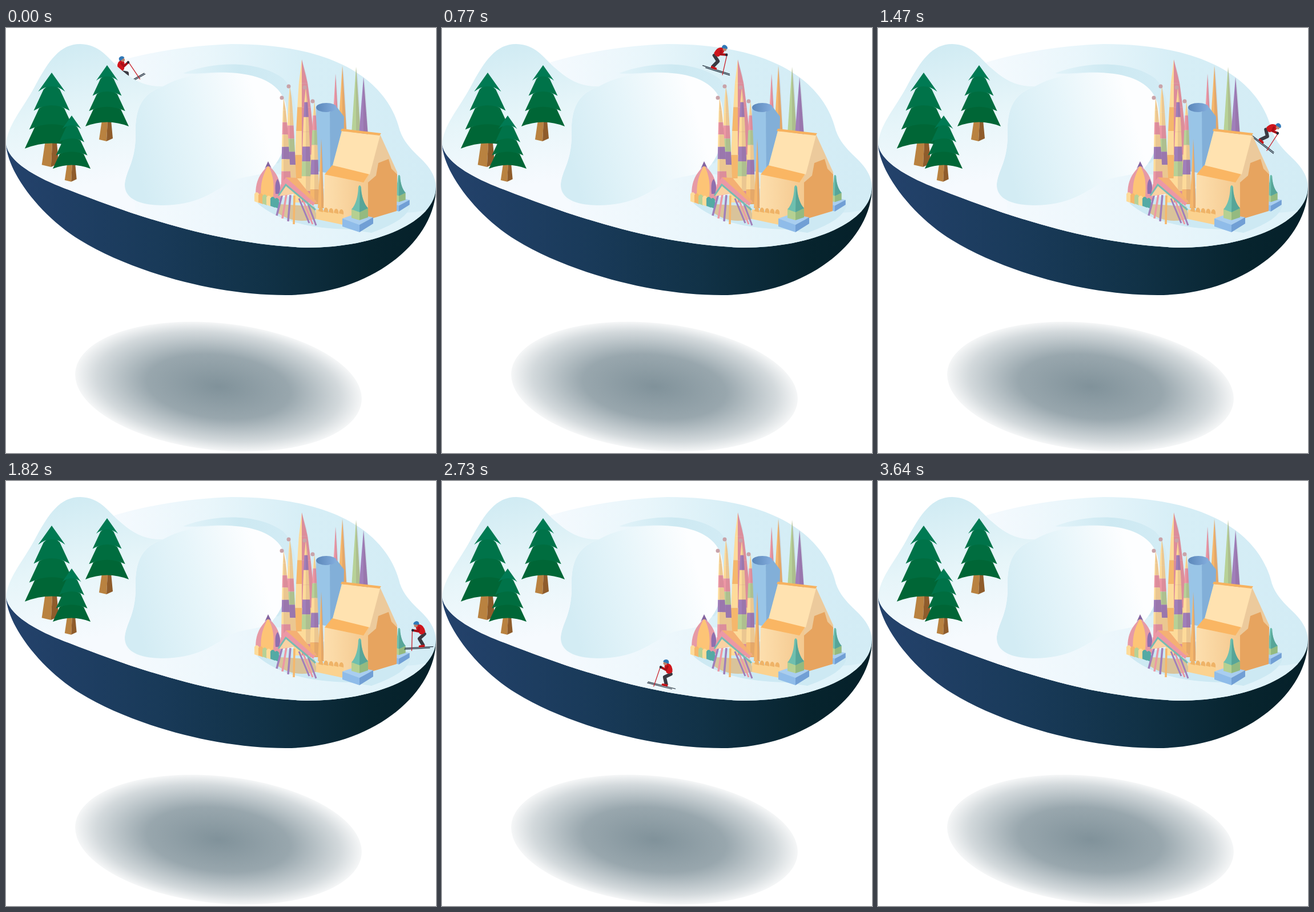
Write an HTML page that moves like this. It is 753 px wide and 743 px high and loops after 3.94 s.

```html
<!DOCTYPE html>
<html lang="en">
<head>
<meta charset="utf-8">
<title>Skier on a floating island</title>
<style>
  html, body { margin: 0; width: 100%; height: 100%; overflow: hidden; background: #fff; }
  svg { display: block; width: 100%; height: 100%; }
</style>
</head>
<body>
<svg viewBox="0 0 753 743">
  <defs>
    <linearGradient id="side">
      <stop stop-color="#24426c"/><stop offset=".35" stop-color="#193a59"/>
      <stop offset=".6" stop-color="#113247"/><stop offset=".85" stop-color="#07242e"/><stop offset="1" stop-color="#052029"/>
    </linearGradient>
    <linearGradient id="ground" gradientUnits="userSpaceOnUse" x1="190" x2="753" y1="200" y2="180">
      <stop stop-color="#f5fafe"/><stop offset=".3" stop-color="#e9f6fb"/>
      <stop offset=".6" stop-color="#d6eef6"/><stop offset="1" stop-color="#d3ecf5"/>
    </linearGradient>
    <linearGradient id="front" gradientUnits="userSpaceOnUse" x1="200" x2="700" y1="0" y2="0">
      <stop stop-color="#f5fafe"/><stop offset="1" stop-color="#dff2f9"/>
    </linearGradient>
    <linearGradient id="hill" gradientUnits="userSpaceOnUse" x1="105" x2="150" y1="30" y2="275">
      <stop stop-color="#d0ebf3"/><stop offset=".5" stop-color="#e6f5f9"/><stop offset="1" stop-color="#f6fafe"/>
    </linearGradient>
    <linearGradient id="bowl" gradientUnits="userSpaceOnUse" x1="222" x2="450" y1="225" y2="160">
      <stop stop-color="#d3ecf4"/><stop offset=".5" stop-color="#e6f5fa"/><stop offset="1" stop-color="#fdfeff"/>
    </linearGradient>
    <linearGradient id="crescent">
      <stop stop-color="#e2f3f9"/><stop offset=".5" stop-color="#cde9f2"/><stop offset="1" stop-color="#d3ecf5"/>
    </linearGradient>
    <linearGradient id="wall"><stop stop-color="#fddfae"/><stop offset="1" stop-color="#f3c78d"/></linearGradient>
    <linearGradient id="pool"><stop stop-color="#5b87ba"/><stop offset="1" stop-color="#84aede"/></linearGradient>
    <radialGradient id="shadow">
      <stop stop-color="#0b2d3d" stop-opacity=".52"/><stop offset=".5" stop-color="#0b2d3d" stop-opacity=".42"/>
      <stop offset=".85" stop-color="#0b2d3d" stop-opacity=".18"/><stop offset="1" stop-color="#0b2d3d" stop-opacity=".04"/>
    </radialGradient>
    <!-- Everything above the front rim of the island -->
    <clipPath id="aboveRim">
      <path d="M0 0V203C5 236 58 264 110 283C230 330 375 379 527 384C650 384 753 338 753 278V0Z"/>
    </clipPath>
    <!-- Faces right, origin at the middle of the skis -->
    <g id="skier" fill="none" stroke-linecap="round" stroke-linejoin="round">
      <path d="M-25 2L24 -2M-19 3.500L25 0" stroke="#26323f" stroke-width="1.200"/>
      <path d="M-13 -22L-3 -15L-8 -3" stroke="#3a3a42" stroke-width="6"/>
      <path d="M-9 -1.500h7" stroke="#c4161c" stroke-width="4"/>
      <path d="M-15 -26Q-14 -38 -5 -40Q2 -38 0 -32L-5 -23Q-11 -20 -15 -26Z" fill="#cf161d"/>
      <path d="M-5 -34L-3 -28L6 -31" stroke="#a90f18" stroke-width="4"/>
      <path d="M7 -33L13 4" stroke="#c9202a" stroke-width="1.300"/>
      <circle cx="6.500" cy="-31" r="2.300" fill="#252b38"/>
      <circle cx="0" cy="-39" r="3.300" fill="#b9826b"/>
      <path d="M-6 -39Q-7 -46 -1 -46Q4 -45 4 -41Z" fill="#2f78b7"/>
    </g>
  </defs>

  <ellipse cx="372" cy="627" rx="252" ry="111" transform="rotate(6 372 627)" fill="url(#shadow)"/>
  <path fill="url(#side)" d="M0 203C3 254 62 330 130 371C220 426 365 467 490 467C640 467 753 372 753 278L527 250L110 200Z"/>
  <g clip-path="url(#aboveRim)">
    <path fill="url(#ground)" d="M0 203V400H753V278C750 232 706 224 690 180C671 100 588 28 395 28C310 31 240 45 190 60Z"/>
    <path fill="url(#front)" d="M208 260V400H735V318C640 345 560 250 450 255Z"/>
    <path fill="url(#crescent)" d="M310 79C370 56 445 58 485 88C520 120 510 190 478 236L455 240C500 170 490 90 390 78C360 76 330 82 310 79Z"/>
    <path fill="url(#bowl)" d="M275 102C300 88 335 78 385 78C440 79 478 95 489 130C500 180 488 225 462 249C435 262 415 257 392 270C360 288 335 310 272 310C225 309 207 294 208 272C210 250 226 235 227 190C225 140 238 115 275 102Z"/>
  </g>
  <use id="back" href="#skier"/>
  <path clip-path="url(#aboveRim)" fill="url(#hill)" d="M0 205C2 170 27 145 50 103C75 56 95 28 130 28C164 29 176 50 197 69C222 91 242 103 275 102C238 115 225 140 227 190C226 235 210 250 208 272C207 290 214 300 226 305V400H0Z"/>
  <g id="scenery"></g>
  <use id="fore" href="#skier"/>
</svg>
<script>
const byId = id => document.getElementById(id);
const LOOP = 3940, STEP = 70, TURN = 1750, GONE = 3640;
const HUES = { y: '#fddb9a', o: '#f5b76c', p: '#ec98a5', v: '#a07fba', g: '#b7d197', b: '#54aaa4' };

const poly = (points, fill) => `<polygon points="${points}" fill="${fill}"/>`;
const path = (d, fill) => `<path d="${d}" fill="${fill}"/>`;
const line = (d, stroke, width) => `<path d="${d}" stroke="${stroke}" stroke-width="${width}" fill="none"/>`;
const repeat = (n, make) => Array.from({ length: n }, (_, i) => make(i)).join('');

// Colour bands run from the tip down; the right half is shaded
function spire(x, y, base, left, right, bands) {
  const n = bands.length;
  const spread = i => (i / n) ** .6;
  const level = i => y + (base - y) * i / n;
  const halves = repeat(n, i => poly(
    [x - left * spread(i), level(i), x + right * spread(i), level(i),
     x + right * spread(i + 1), level(i + 1), x - left * spread(i + 1), level(i + 1)], HUES[bands[i]]));
  const shade = path(`M${x} ${y}` + repeat(9, i => `L${x + right * ((i + 1) / 9) ** .6} ${y + (base - y) * (i + 1) / 9}`) + `H${x}Z`, '#6a3a501f');
  return halves + shade;
}
const knob = (x, y) => `<circle cx="${x}" cy="${y}" r="3.500" fill="#c9a3a9"/>`;

function tree(x, y, size) {
  const tier = i => {
    const w = 38 - 6.3 * i, low = 107 - 26.7 * i;
    const top = i < 3 ? `M0 ${low - 40}L${w - 14} ${low - 30}` : 'M0 0';
    const close = i < 3 ? `L${14 - w} ${low - 30}Z` : 'Z';
    return path(`${top}L${w} ${low}Q0 ${low - 15} ${-w} ${low}${close}`, `hsl(${152 + i * 3} 100% ${20 + i * 1.3}%)`);
  };
  return `<g transform="translate(${x} ${y}) scale(${size})">` +
    poly('-9,96 -14,130 -1,133 1,96', '#b98240') + poly('1,96 -1,133 10,128 7,96', '#8f5c2b') +
    repeat(4, tier) + '</g>';
}

function plinth(x, y, size) {
  return `<g transform="translate(${x} ${y}) scale(${size})">` +
    poly('-30,0 -7,-8 24,-2 0,11', '#a9cef0') + poly('-30,0 0,11 0,24 -30,14', '#8fbce9') +
    poly('0,11 24,-2 24,9 0,24', '#719fd5') +
    poly('-14,-16 0,-12 0,3 -14,-1', '#b5d092') + poly('0,-12 15,-18 15,-2 0,3', '#94ba80') +
    path('M-14 -16Q-3 -28 -2 -55Q0 -61 3 -55Q4 -28 15 -18L0 -11Z', '#6fbfae') +
    path('M1 -58Q5 -28 15 -18L0 -11Z', '#57a598') + '</g>';
}

const towers =
  path('M440 306Q490 350 600 352L640 358Q705 335 708 310L560 280Z', '#cde9f3') +
  spire(577, 80, 185, 6, 6, 'p') + spire(589, 66, 190, 8, 8, 'o') +
  spire(613, 68, 185, 8, 8, 'g') + spire(626, 86, 188, 8, 8, 'v') +
  poly('543,139 567,147 571,255 543,250', '#99c5e7') + poly('567,147 580,139 592,155 590,250 568,255', '#82afd8') +
  '<ellipse cx="561" cy="139" rx="18" ry="8" fill="url(#pool)"/>' +
  spire(518, 55, 305, 15, 0, 'yyoyoy') + spire(518, 55, 305, 0, 30, 'ppppyp') +
  spire(497, 102, 262, 7, 11, 'yyypgvy') + knob(495, 102) +
  spire(525, 104, 285, 8, 10, 'yvyyvgy') + knob(523, 104) +
  spire(486, 122, 272, 4, 13, 'yypyvyp') + knob(483, 122) +
  spire(540, 127, 308, 8, 9, 'ypgyvyo') + knob(537, 128) +
  spire(552, 194, 315, 6, 5, 'o');

const nave =
  plinth(688, 302, .78) +
  poly('558,256 573,240 637,254 634,334 600,338 556,314', 'url(#wall)') +
  poly('571,240 637,253 626,270 558,256', '#fab663') +
  poly('655,186 685,252 684,318 634,334 634,262', '#ecca9c') +
  poly('588,180 655,188 637,256 572,240', '#ffe2b0') +
  poly('588,176 657,184 654,188 586,180', '#f7b25f') +
  poly('634,270 648,258 652,236 670,229 675,246 685,256 684,320 634,335', '#e7a45f');

const chapel =
  path('M438 300C434 268 446 254 459 240C474 252 484 268 480 302Z', '#e69aa6') +
  path('M447 300C444 268 452 254 459 240C470 260 470 280 467 302Z', '#fdc476') +
  path('M472 290Q470 268 476 264Q482 275 480 290Z', '#8f6fae') +
  path('M453 246Q459 238 465 245L459 233Z', '#84649f') +
  repeat(6, i => path(`M${435 + i * 7} ${303 + i * 2}v-13q4 -6 8 0v16Z`, HUES['yogybb'[i]]));

const porch =
  path('M474 322Q505 345 545 333L540 312L480 308Z', '#d9c39a') +
  repeat(4, i => line(`M${484 + i * 7} ${290 + i}l${i * 3 - 10} ${38 + i * 4}`, HUES['vpvo'[i]], 3.500)) +
  repeat(3, i => line(`M${513 + i * 8} ${298 + i * 5}l${18 - i * 2} ${43 - i * 3}`, HUES['vpv'[i]], 3)) +
  poly('481,274 490,261 543,302 538,311 509,289 478,294', '#ec98a5') +
  poly('490,261 509,262 545,306 538,304', '#f4b074') +
  poly('490,272 509,289 478,294', '#f9d2a3') +
  line('M477 293L490 274L542 318', '#78bbb2', 3);

const frontWall =
  poly('543,317 592,326 590,344 543,334', '#fbd28f') +
  repeat(5, i => path(`M${547 + i * 9} ${320 + i}q1 -8 5 -7q4 2 3 9Z`, '#efb367')) +
  plinth(619, 333, 1);

byId('scenery').innerHTML = tree(80, 78, 1.24) + tree(177, 65, 1) + tree(115, 153, .87) +
  towers + nave + chapel + porch + frontWall;

// Each leg of the run has a start time and a curve covered at steady speed
const legs = [
  [0, 'M221 91C275 66 330 53 389 53'],
  [490, 'M389 53C450 53 520 86 583 131'],
  [1120, 'M583 131C650 178 705 225 735 272'],
  [TURN, 'M737 269C712 312 660 375 569 375'],
  [2310, 'M569 375C450 374 320 348 203 317'],
  [3150, 'M203 317C140 300 75 275 15 237']
].map(([start, d], i, all) => {
  const curve = document.createElementNS('http://www.w3.org/2000/svg', 'path');
  curve.setAttribute('d', d);
  return { start, end: i + 1 < all.length ? all[i + 1][0] : GONE, curve, length: curve.getTotalLength() };
});

function draw(now) {
  const t = Math.floor(now % LOOP / STEP) * STEP;
  const turned = t >= TURN;
  byId('back').style.display = turned ? 'none' : '';
  byId('fore').style.display = turned && t < GONE ? '' : 'none';
  if (t >= GONE) return;

  const { start, end, curve, length } = legs.find(leg => t < leg.end);
  const along = length * (t - start) / (end - start);
  const { x, y } = curve.getPointAtLength(along);
  const a = curve.getPointAtLength(along - 1), b = curve.getPointAtLength(along + 1);
  const slope = Math.atan((b.y - a.y) / (b.x - a.x)) * 180 / Math.PI;
  // After the turn the skier leans into the slope bit by bit
  const tilt = turned ? slope * Math.min(1, (t - TURN) / 500) : slope;
  byId(turned ? 'fore' : 'back').setAttribute('transform',
    `translate(${x} ${y}) rotate(${tilt}) scale(${turned ? -1 : 1} 1)`);
}

const began = performance.now();
function tick() {
  draw(performance.now() - began);
  requestAnimationFrame(tick);
}
tick();
</script>
</body>
</html>
```
